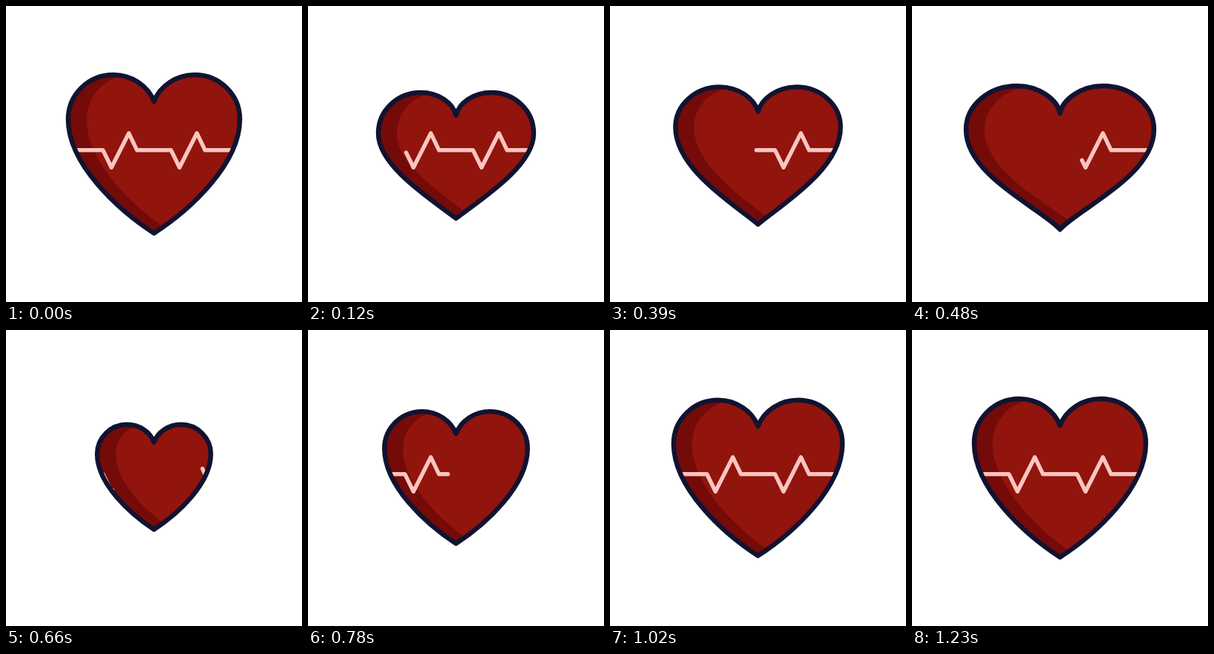
Recreate the animation shown at these times as an HTML page. Size 400 px wide and 400 px high, loop 3710 ms.

```html
<!DOCTYPE html>
<html lang="en">
<head>
<meta charset="utf-8">
<title>Heartbeat</title>
<style>
  html, body { margin: 0; width: 100%; height: 100%; overflow: hidden; background: #fff; }
  svg { display: block; width: 100%; height: 100%; }
  .pulse { fill: none; stroke: #fbc5c0; stroke-width: 5.4; stroke-linecap: round; stroke-linejoin: round; }
</style>
</head>
<body>
<svg viewBox="0 0 400 400">
  <clipPath id="inside"><path id="clip"/></clipPath>
  <g clip-path="url(#inside)">
    <rect width="400" height="400" fill="#740b08"/>
    <path id="light" fill="#91140d"/>
    <polyline id="leaving" class="pulse"/>
    <polyline id="arriving" class="pulse"/>
  </g>
  <path id="outline" fill="none" stroke="#111331" stroke-width="6.4" stroke-linejoin="round"/>
</svg>
<script>
const LOOP = 3710, STEP = 30, END = 1230, MID = 200, SHADE = 25;
const $ = id => document.getElementById(id);
const clamp = u => Math.min(1, Math.max(0, u));
const smooth = u => u * u * (3 - 2 * u);
const easeOut = u => 1 - (1 - u) ** 3;

// Left half of the heart, x y pairs: notch, two handles, lobe top, side, two handles, tip
const rest = [200, 129, 192, 108, 170, 93, 145, 93, 84, 153, 84, 214, 152, 276, 200, 307];
const squashSmall = [200, 148, 196, 131, 177, 117, 152, 117, 95, 172, 95, 215, 160, 257, 200, 287];
const squashBig = [200, 145, 197, 127, 172, 108, 142, 108, 73, 167, 73, 230, 176, 274, 200, 302];
const scaled = s => rest.map((v, i) => {
  const origin = i % 2 ? 196 : MID;
  return origin + (v - origin) * s;
});

const keys = [
  { t: 0, shape: rest },
  { t: 120, shape: squashSmall, ease: smooth },
  { t: 300, shape: scaled(0.828), ease: smooth },
  { t: 480, shape: squashBig, ease: smooth },
  { t: 660, shape: scaled(0.662), ease: smooth },
  { t: END, shape: rest, ease: easeOut }
];

function shapeAt(t) {
  const i = Math.max(1, keys.findIndex(k => t <= k.t));
  const a = keys[i - 1], b = keys[i];
  const u = b.ease(clamp((t - a.t) / (b.t - a.t)));
  return a.shape.map((v, j) => v + (b.shape[j] - v) * u);
}

// Anchors and handles, with a rounded quarter from lobe top to side
function points(shape) {
  const p = [];
  for (let i = 0; i < shape.length; i += 2) p.push([shape[i], shape[i + 1]]);
  const [notch, n2, n1, top, side, c1, c2, tip] = p;
  const k = 0.5523;
  const h1 = [top[0] + (side[0] - top[0]) * k, top[1]];
  const h2 = [side[0], side[1] + (top[1] - side[1]) * k];
  return [notch, n2, n1, top, h1, h2, side, c1, c2, tip];
}

const mirror = ([x, y]) => [2 * MID - x, y];

function heartPath(pts) {
  const back = pts.slice(0, -1).reverse().map(mirror);
  return `M${pts[0]}C${pts.slice(1).join(" ")}C${back.join(" ")}Z`;
}

function lightPath(pts) {
  const edge = pts.slice(3).map(([x, y]) => [x + SHADE, y]);
  return `M${edge[0]}C${edge.slice(1).join(" ")}V400H400V0H${edge[0][0]}Z`;
}

// Pulse line: flat, dip, spike, flat, dip, spike, flat
const beat = x => [[x, 194.8], [x + 11.5, 218.3], [x + 35, 171.8], [x + 46, 194.8]];
const line = [[81, 194.8], ...beat(131), ...beat(223), [319, 194.8]];
const total = line.slice(1).reduce((sum, [x, y], i) =>
  sum + Math.hypot(x - line[i][0], y - line[i][1]), 0);
for (const id of ["leaving", "arriving"]) $(id).setAttribute("points", line.join(" "));

function trim(id, from, to) {
  const el = $(id);
  el.style.display = to > from ? "" : "none";
  el.setAttribute("stroke-dasharray", `${Math.max(0, to - from)} 2000`);
  el.setAttribute("stroke-dashoffset", -from);
}

function draw(time) {
  const t = Math.min(END, Math.floor(time % LOOP / STEP) * STEP);
  const pts = points(shapeAt(t));
  const d = heartPath(pts);
  $("clip").setAttribute("d", d);
  $("outline").setAttribute("d", d);
  $("light").setAttribute("d", lightPath(pts));
  trim("leaving", total * clamp(t / 790), total);
  trim("arriving", 0, total * clamp((t - 552) / 486));
}

const start = performance.now();
function tick() {
  draw(performance.now() - start);
  requestAnimationFrame(tick);
}
tick();
</script>
</body>
</html>
```
